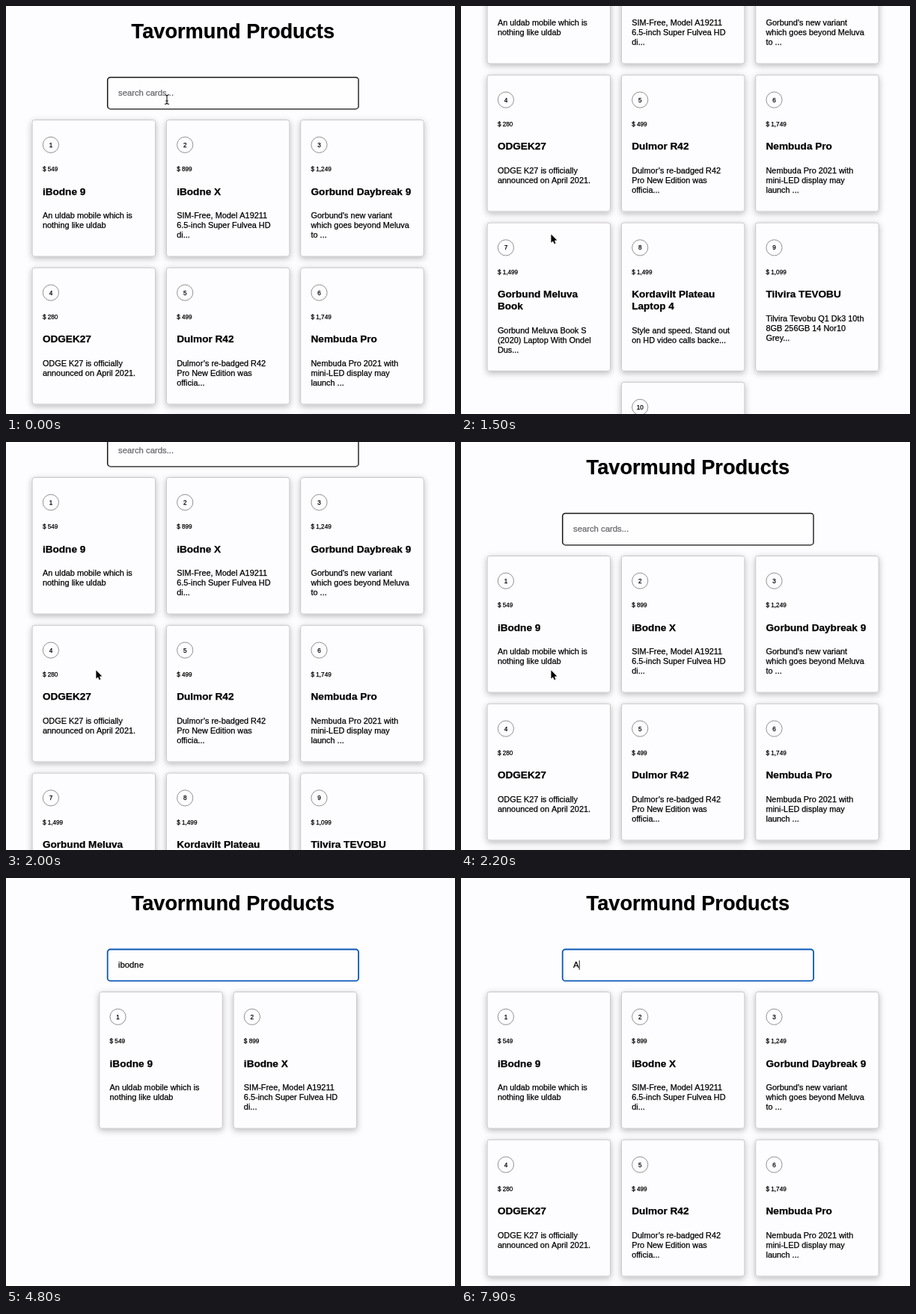
An HTML page with a canvas that plays this animation: 600 by 546 pixels, repeating every 8000 ms.

```html
<!DOCTYPE html>
<html lang="en">
<head>
<meta charset="utf-8">
<title>Product search</title>
<style>
  html, body { margin: 0; width: 100%; height: 100%; overflow: hidden; background: #fdfcfe; }
  canvas { display: block; width: 600px; height: 546px; }
</style>
</head>
<body>
<canvas id="stage"></canvas>
<script>
const W = 600, H = 546, LOOP = 8000, STEP = 100;
const PAPER = '#fdfcfe', BLUE = '#0a58b8';
const FONT = '"Liberation Sans", Arial, sans-serif';

const canvas = document.getElementById('stage');
const ctx = canvas.getContext('2d');
const dpr = window.devicePixelRatio || 1;
canvas.width = W * dpr;
canvas.height = H * dpr;

// price, title lines, description lines
const cards = [
  ['549', 'iBodne 9', 'An uldab mobile which is|nothing like uldab'],
  ['899', 'iBodne X', 'SIM-Free, Model A19211|6.5-inch Super Fulvea HD|di...'],
  ['1,249', 'Gorbund Daybreak 9', 'Gorbund\'s new variant|which goes beyond Meluva|to ...'],
  ['280', 'ODGEK27', 'ODGE K27 is officially|announced on April 2021.'],
  ['499', 'Dulmor R42', 'Dulmor’s re-badged R42|Pro New Edition was|officia...'],
  ['1,749', 'Nembuda Pro', 'Nembuda Pro 2021 with|mini-LED display may|launch ...'],
  ['1,499', 'Gorbund Meluva|Book', 'Gorbund Meluva Book S|(2020) Laptop With Ondel|Dus...'],
  ['1,499', 'Kordavilt Plateau|Laptop 4', 'Style and speed. Stand out|on HD video calls backe...'],
  ['1,099', 'Tilvira TEVOBU', 'Tilvira Tevobu Q1 Dk3 10th|8GB 256GB 14 Nor10|Grey...'],
  ['1,099', 'UD Balvirin 15-|TB2094RM', 'UD Balvirin 15-TB2094RM|Gaming Laptop 10th Gen|Cor...']
].map(([price, title, text], i) => {
  const titles = title.split('|'), lines = text.split('|');
  const height = 144.9 + 12.9 * lines.length + 15.7 * (titles.length - 1);
  return { id: i + 1, price, titles, lines, height };
});
const all = cards.map(c => c.id);

// start time, field text, ids of the cards found
const queries = [
  [0, '', all],
  [3500, 'i', all],
  [3700, 'ib', [1, 2, 7]],
  [3900, 'ibo', [1, 2]],
  [4100, 'ibod', [1, 2]],
  [4200, 'ibodn', [1, 2]],
  [4300, 'ibodne', [1, 2]],
  [5200, '', all],
  [5700, '5', [1, 2, 9, 10]],
  [5900, '54', [1]],
  [6000, '549', [1]],
  [7000, '', all],
  [7900, 'A', all]
];
const FOCUS = 2800;
const caretOn = [[2800, 3300], [3500, 4800], [5200, 6500], [7000, 7500], [7900, 8000]];

// time, value(s)
const scrollPath = [
  [1100, 0], [1200, 10], [1300, 82], [1400, 178], [1500, 258], [1600, 306], [1700, 322],
  [1800, 286], [1900, 200], [2000, 105], [2100, 28], [2200, 0]
];
const pointerPath = [
  [0, 215, 125], [300, 260, 99], [400, 226, 150], [500, 172, 232], [600, 132, 288],
  [700, 120.7, 307], [800, 120.7, 307], [900, 120.4, 305.6], [2300, 120.4, 305.6],
  [2500, 160, 478], [2600, 205, 340], [2700, 240, 180], [2800, 255, 119]
];
const POINTER_END = 3500;

function along(path, t) {
  let i = 0;
  while (i < path.length - 1 && path[i + 1][0] <= t) i++;
  const a = path[i], b = path[i + 1] || a;
  const k = b === a ? 0 : Math.max(0, (t - a[0]) / (b[0] - a[0]));
  return a.slice(1).map((v, n) => v + (b[n + 1] - v) * k);
}

// a hairline stroke gives the slightly heavy look of smoothed text
function write(str, x, y, size, weight = 400, color = '#000', align = 'left') {
  ctx.font = `${weight} ${size}px ${FONT}`;
  ctx.textAlign = align;
  ctx.fillStyle = ctx.strokeStyle = color;
  ctx.lineWidth = 0.25;
  ctx.lineJoin = 'round';
  ctx.fillText(str, x, y);
  ctx.strokeText(str, x, y);
}

function box(x, y, w, h, r) {
  ctx.beginPath();
  ctx.roundRect(x, y, w, h, r);
}

function drawCard(card, x, y, h) {
  ctx.save();
  ctx.shadowColor = 'rgba(0,0,0,0.27)';
  ctx.shadowBlur = 8 * dpr;
  ctx.shadowOffsetY = 2.5 * dpr;
  box(x, y, 165.5, h, 3.5);
  ctx.fillStyle = PAPER;
  ctx.fill();
  ctx.restore();
  box(x + 0.5, y + 0.5, 164.5, h - 1, 3);
  ctx.lineWidth = 1;
  ctx.strokeStyle = '#c6c5c7';
  ctx.stroke();

  const left = x + 14.3;
  ctx.beginPath();
  ctx.arc(left + 11, y + 33.8, 10.6, 0, Math.PI * 2);
  ctx.lineWidth = 0.8;
  ctx.strokeStyle = '#777';
  ctx.stroke();
  write(card.id, left + 11, y + 36.8, 8.16, 400, '#000', 'center');
  write('$ ' + card.price, left, y + 68.9, 8.16);
  card.titles.forEach((s, i) => write(s, left, y + 100.6 + i * 15.8, 13.6, 700));
  const top = y + 132.4 + (card.titles.length - 1) * 15.8;
  card.lines.forEach((s, i) => write(s, left, top + i * 12.9, 10.9));
}

function drawCards(ids) {
  let y = 152;
  for (let i = 0; i < ids.length; i += 3) {
    const row = ids.slice(i, i + 3).map(id => cards[id - 1]);
    const h = Math.max(...row.map(c => c.height));
    row.forEach((c, n) => drawCard(c, 213.9 + (n - (row.length - 1) / 2) * 179.3, y, h));
    y += h + 14.2;
  }
}

function drawField(text, focused, caret) {
  const outline = () => box(135.7, 95.5, 335.4, 42.2, 3.8);
  outline();
  ctx.fillStyle = '#fefdff';
  ctx.fill();
  ctx.lineWidth = focused ? 1.8 : 1.5;
  ctx.strokeStyle = focused ? BLUE : '#151515';
  ctx.stroke();
  if (!focused) {
    // lighter right and bottom sides of the inset border
    ctx.save();
    ctx.beginPath();
    ctx.moveTo(473, 94);
    ctx.lineTo(450, 117);
    ctx.lineTo(157, 117);
    ctx.lineTo(134, 140);
    ctx.lineTo(473, 140);
    ctx.clip();
    outline();
    ctx.strokeStyle = '#626262';
    ctx.stroke();
    ctx.restore();
  }
  write(text || 'search cards...', 150, 120.1, 11.3, 400, text ? '#000' : '#676769');
  if (caret) {
    const x = 150 + (text ? ctx.measureText(text).width : 0);
    ctx.fillStyle = '#000';
    ctx.fillRect(x + 0.2, 110.3, 0.9, 12.6);
  }
}

function drawArrow(x, y) {
  const pts = [[0, 0], [0, 11.2], [2.5, 8.8], [4.2, 12.7], [6.1, 11.9], [4.5, 8.1], [7.9, 8]];
  ctx.beginPath();
  pts.forEach(([dx, dy]) => ctx.lineTo(x + dx, y + dy));
  ctx.closePath();
  ctx.lineWidth = 1.8;
  ctx.lineJoin = 'round';
  ctx.strokeStyle = '#fff';
  ctx.stroke();
  ctx.fillStyle = '#000';
  ctx.fill();
}

function drawBeam(x, y) {
  const path = () => {
    ctx.beginPath();
    for (const s of [-1, 1]) {
      ctx.moveTo(x - 3, y + s * 6.3);
      ctx.quadraticCurveTo(x, y + s * 6.3, x, y + s * 4.2);
      ctx.quadraticCurveTo(x, y + s * 6.3, x + 3, y + s * 6.3);
    }
    ctx.moveTo(x, y - 4.5);
    ctx.lineTo(x, y + 4.5);
    ctx.moveTo(x - 1.8, y + 2);
    ctx.lineTo(x + 1.8, y + 2);
  };
  for (const [width, color] of [[2.6, '#fff'], [1.1, '#111']]) {
    path();
    ctx.lineWidth = width;
    ctx.strokeStyle = color;
    ctx.stroke();
  }
}

function draw(t) {
  ctx.setTransform(dpr, 0, 0, dpr, 0, 0);
  ctx.fillStyle = PAPER;
  ctx.fillRect(0, 0, W, H);

  const [, text, ids] = queries.filter(q => q[0] <= t).pop();
  const caret = caretOn.some(([a, b]) => t >= a && t < b);
  const [scroll] = along(scrollPath, t);

  ctx.save();
  ctx.translate(0, -scroll);
  write('Tavormund Products', 303.3, 42.5, 27.2, 700, '#000', 'center');
  drawCards(ids);
  drawField(text, t >= FOCUS, caret);
  ctx.restore();

  if (t < POINTER_END) {
    const [x, y] = along(pointerPath, t);
    const overField = y > 95 && y < 138 && x > 135 && x < 472;
    (overField ? drawBeam : drawArrow)(x, y);
  }
}

const start = performance.now();
function tick() {
  const t = (performance.now() - start) % LOOP;
  draw(Math.floor(t / STEP) * STEP);
  requestAnimationFrame(tick);
}
tick();
</script>
</body>
</html>
```
